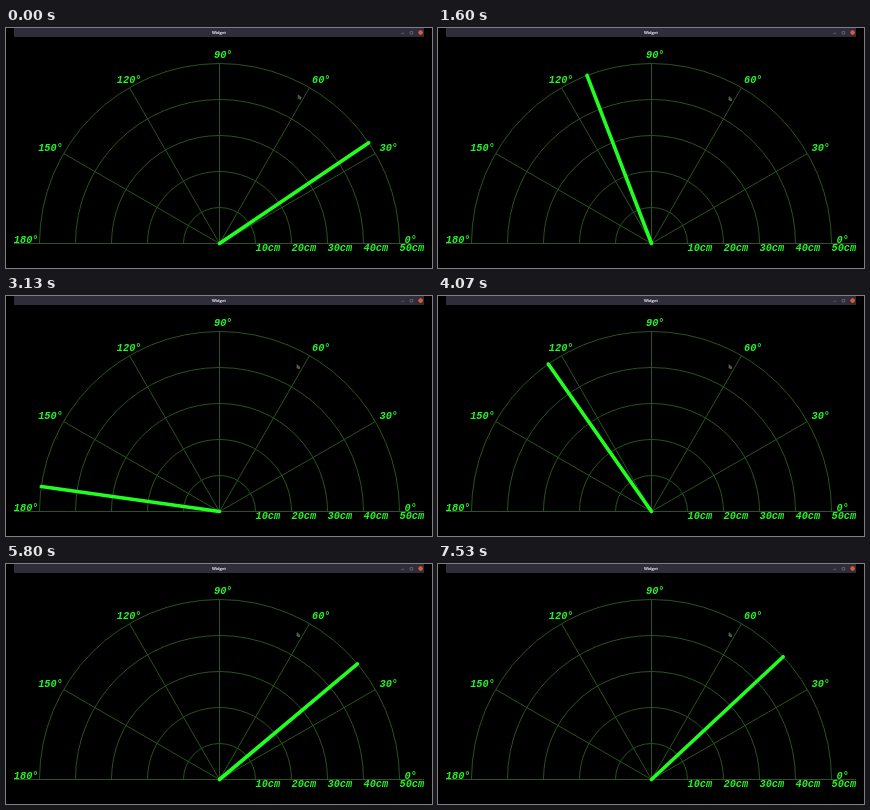
Write an HTML page that moves like this. It is 426 px wide and 240 px high and loops after 7590 ms.

```html
<!DOCTYPE html>
<html lang="en">
<head>
<meta charset="utf-8">
<title>Widget</title>
<style>
  html, body { margin: 0; width: 100%; height: 100%; overflow: hidden; background: #000; }
  svg { display: block; width: 100vw; height: 100vh; }
  .grid { fill: none; stroke: #27541f; stroke-width: 1; }
  .labels { font: italic bold 10.3px "Liberation Mono", "Courier New", monospace; fill: #24f524; }
  .title { font: bold 4px "Open Sans", sans-serif; fill: #eee; text-anchor: middle; }
  #beam { stroke: #20ff20; stroke-width: 3.6; stroke-linecap: round; }
</style>
</head>
<body>
<svg viewBox="0 0 426 240">
  <rect x="8" width="410" height="9" fill="#2f2d3a"/>
  <text class="title" x="213" y="6">Widget</text>
  <path d="M395.5 5.3h2.6M404.2 3.4h2.6v2.6h-2.6z" fill="none" stroke="#888" stroke-width=".5"/>
  <circle cx="414.6" cy="4.6" r="2.3" fill="#e0583a"/>
  <g class="grid" id="grid"></g>
  <g class="labels" id="labels"></g>
  <line id="beam"/>
  <path id="cursor" d="M0 0v3.6l1-.7 .8 1.4 .7-.4-.7-1.3h1.2z" fill="#333" stroke="#999" stroke-width=".5"/>
</svg>
<script>
const CX = 213.5, CY = 215.5, R = 180, LOOP = 7590, STEP = 200 / 3;
const $ = id => document.getElementById(id);

function add(parent, tag, attrs, text = '') {
  const el = document.createElementNS('http://www.w3.org/2000/svg', tag);
  for (const name in attrs) el.setAttribute(name, attrs[name]);
  el.textContent = text;
  parent.append(el);
}

function polar(deg, r = R) {
  const a = deg * Math.PI / 180;
  return [CX + r * Math.cos(a), CY - r * Math.sin(a)];
}

for (let i = 1; i <= 5; i++) {
  const r = 36 * i;
  add($('grid'), 'path', { d: `M${CX - r} ${CY}a${r} ${r} 0 0 1 ${2 * r} 0` });
  add($('labels'), 'text', { x: CX + r, y: 223.3 }, `${i}0cm`);
}
for (let deg = 30; deg < 180; deg += 30)
  add($('grid'), 'path', { d: `M${CX} ${CY}L${polar(deg)}` });
add($('grid'), 'path', { d: `M8 ${CY}H418` });

const labels = [[0, 398.5, 215.3], [30, 373.5, 123], [60, 306, 55], [90, 208, 30.3],
  [120, 110.8, 55], [150, 32.2, 123], [180, 7.8, 215.3]];
for (const [deg, x, y] of labels) add($('labels'), 'text', { x, y }, deg + '°');

// Time and total degrees swept; the sweep folds back at 180 and 0.
const sweep = [[0, 34], [1600, 111], [3130, 188], [4070, 235], [5200, 290], [6400, 350], [7530, 403]];

function angleAt(t) {
  let i = 1;
  while (i < sweep.length - 1 && t > sweep[i][0]) i++;
  const [t0, a0] = sweep[i - 1], [t1, a1] = sweep[i];
  const total = Math.round(a0 + (a1 - a0) * (t - t0) / (t1 - t0)) % 360;
  return total > 180 ? 360 - total : total;
}

// Start of the display step that is on screen at time t, on a 10 ms clock.
const stepTime = k => Math.round(k * STEP / 10) * 10;
function quantize(t) {
  const k = Math.round(t / STEP);
  return Math.min(7530, stepTime(stepTime(k) > t ? k - 1 : k));
}

function draw(now) {
  const t = quantize(now % LOOP);
  const [x, y] = polar(angleAt(t));
  const beam = { x1: CX, y1: CY, x2: x, y2: y };
  for (const name in beam) $('beam').setAttribute(name, beam[name]);
  const drift = Math.min(1, t / 1600);
  $('cursor').setAttribute('transform', `translate(${292.3 - 1.3 * drift} ${67 + 1.7 * drift})`);
}

const start = performance.now();
function tick() {
  draw(performance.now() - start);
  requestAnimationFrame(tick);
}
tick();
</script>
</body>
</html>
```
